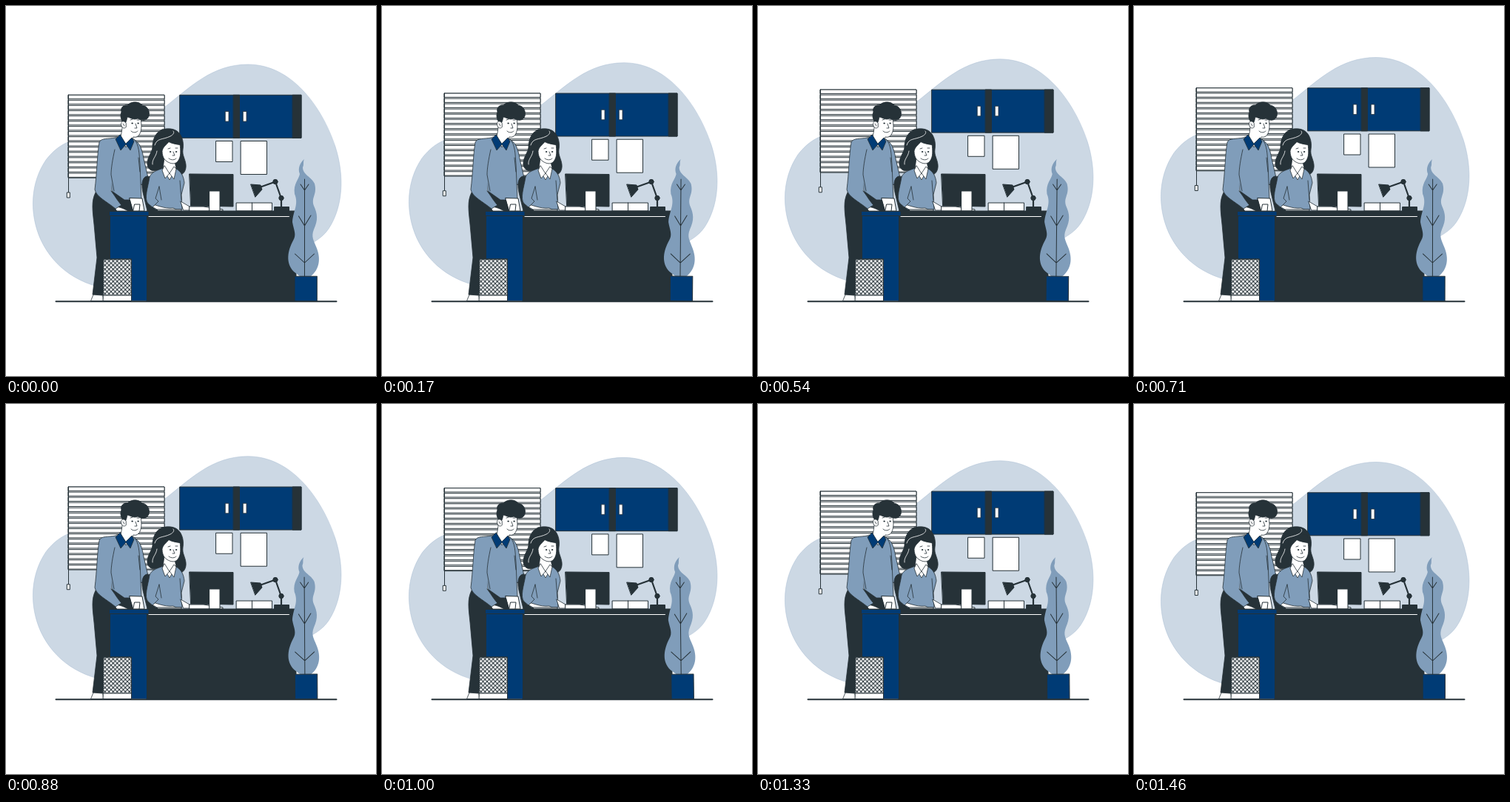
Recreate the animation shown at these times as an HTML page. Size 500 by 500 pixels, loop 1.5 s.

```html
<!DOCTYPE html>
<html lang="en">
<head>
<meta charset="utf-8">
<title>Office</title>
<style>
  html, body { margin: 0; width: 100%; height: 100%; overflow: hidden; background: #fff; }
  svg { display: block; width: 100%; height: 100%; }
  .ink { fill: #263238; }
  .blue { fill: #003b75; }
  .mid { fill: #809dba; }
  .pale { fill: #ccd8e4; }
  .white { fill: #fff; }
  .edge { stroke: #263238; stroke-width: 1; stroke-linejoin: round; stroke-linecap: round; }
  .line { fill: none; }
  .thin { stroke-width: .8; }
</style>
</head>
<body>
<svg viewBox="0 0 500 500">
  <defs>
    <pattern id="mesh" width="5.5" height="5.5" x="131" y="342" patternUnits="userSpaceOnUse">
      <path d="M0 0L5.5 5.5M5.5 0L0 5.5" stroke="#263238" stroke-width="1"/>
      <circle cx="2.75" cy="2.75" r="1.1" class="ink"/>
    </pattern>
  </defs>

  <g id="wall">
    <path class="pale" stroke="#a9bdd2" stroke-width=".5" d="M327 79C386 79 427 136 445 190C458 231 455 272 436 301C419 326 385 330 350 345C290 368 215 392 150 384C100 379 65 354 47 316C31 280 33 239 54 208C68 190 84 180 110 178C155 174 190 155 214 137C249 110 278 79 327 79Z"/>
    <g id="blind" class="white edge"></g>
    <path class="line edge" d="M84.5 120V252"/>
    <rect class="white edge" x="82.7" y="252" width="3.6" height="7"/>
    <g class="edge">
      <rect class="blue" x="235" y="120.3" width="164" height="58"/>
      <path class="ink" d="M307.5 120.3h8v58h-8zM387.5 120.3H399v58h-11.500z"/>
      <path class="white thin" d="M296.500 142.500h4.500v13.500h-4.500zM320.500 142.500h4.500v13.500h-4.500z"/>
      <path class="white" d="M284 182.500h22v28h-22zM317.500 182.500h35v45h-35z"/>
    </g>
  </g>

  <!-- man -->
  <g class="edge thin">
    <path class="white" d="M119 388L114.500 398.500H133L130 389Z"/>
    <path class="ink" d="M121 252C115 264 117 276 119 295L123 340L117 390L130 391L142 340V277H172L170 250Z"/>
    <path class="mid" d="M172 180C181 184 184 194 186 206L192 232L183 242L170 225Z"/>
    <path class="mid" d="M150 177L173 180C180 187 180 200 181 214L183 262L160 262L143 250L140 185Z"/>
    <path class="white" d="M146 271C152 271 158 273 165 277H150Z"/>
    <path class="mid" d="M148 178C138 180 129 178 126 184C123 202 123 225 120 248C122 258 136 264 148 274L156 269C149 261 147 256 142 250"/>
    <path class="line" d="M147 194C144 207 142 220 142 228L146 250M179 205L181 224"/>
    <path class="white" d="M158 155C157 162 157 169 155 176L162 191L171 179L172 177C180 179 183 170 183 162L182 148L160 147Z"/>
    <path class="blue" d="M154 174L148 180L155 195L162 187L168 195L173 183L170 178L162 186Z"/>
    <path class="ink" d="M158 157C155 153 154 148 156 143C154 137 160 133 164 134C170 128 180 129 184 134C191 135 195 142 193 149C190 156 183 155 178 152C172 155 167 150 164 150C163 154 162 160 159 160Z"/>
    <path class="white" d="M162 158C158 153 154 157 156 162C157 165 160 166 162 164Z"/>
    <path class="line" d="M168 154l3-1M177 154l3 0M175 159l2 6l-3 0M169 169C172 172 176 171 178 169M158 159l2 3"/>
    <circle class="ink" cx="170.500" cy="158.500" r=".7"/>
    <circle class="ink" cx="178.500" cy="158.500" r=".7"/>
  </g>

  <!-- woman -->
  <g class="edge thin">
    <path class="ink" d="M190 230C183 232 183 243 185 252L191 277H205L201 232Z"/>
    <path class="ink" d="M211 167C202 171 199 179 198 188C199 196 192 202 191 211C190 219 196 225 204 222L214 229H232C240 229 244 222 243 214C242 206 238 202 239 194C241 183 237 170 227 167C221 165 215 166 211 167Z"/>
    <path class="mid" d="M213 219C204 222 197 224 194 231C193 245 190 256 190 265L202 275H238L237 255L241 239C240 230 237 224 230 220Z"/>
    <path class="white" d="M197 268C205 269 212 274 226 273L232 276H206L195 270ZM236 264L248 271L273 272L275 276H240Z"/>
    <path class="mid" d="M194 231C192 245 186 260 192 267L198 272L206 264L202 260L207 244"/>
    <path class="line" d="M207 244L210 262M235 236L237 262"/>
    <path class="white" d="M214 205L212 220L221 235L230 220L228 210Z"/>
    <path class="white" d="M214 216L211 222L215 233L221 226L227 234L230 220L227 217L221 226Z"/>
    <path class="white" d="M212 188C210 196 211 204 215 208C220 213 228 215 232 210C237 204 236 195 235 186C227 187 220 185 217 181Z"/>
    <path class="ink" d="M211 195C214 188 218 187 221 182C226 187 232 187 237 188L234 177L218 174L208 182Z"/>
    <path class="line" d="M219 193l3-1M229 192l3 0M226 197l2 5l-3 0M220 206C224 209 228 208 230 206"/>
    <circle class="ink" cx="222" cy="197" r=".7"/>
    <circle class="ink" cx="230" cy="197" r=".7"/>
    <path class="line" style="stroke:#fff" d="M201 188C204 178 212 181 222 176C226 174 228 171 226 169M204 196C203 204 197 207 198 214"/>
  </g>

  <!-- desk -->
  <g class="edge">
    <path class="white" d="M248 271H267L293 275V277H248ZM205 275H237V277H205Z"/>
    <path class="ink" d="M248 227L307 227.500V271L250 270Z"/>
    <path class="white" d="M275 250h14v27h-14zM311.500 266H359.500V277H311.500zM332.500 266V277"/>
    <path class="white" d="M167 259.500L184 260L187 277H172Z"/>
    <path class="white" d="M174 268H181L180 277H172Z"/>
    <path class="line" stroke-width="2" style="stroke-width:2.200" d="M340 246L364 237.500L372 260V272"/>
    <path class="ink" d="M331 241L344 242L346 248L337 258ZM363 271.500H382.500V277H363Z"/>
    <circle class="ink" cx="364" cy="237.500" r="3.200"/>
    <circle class="ink" cx="372" cy="259.500" r="3.200"/>
    <path class="ink" d="M190 277H392V398.500H190Z"/>
    <path class="blue" d="M141 283H190V398.500H141Z" stroke="none"/>
    <path class="blue" d="M140 277.500H193V283.500H140Z"/>
    <path class="line" style="stroke:#fff" d="M193 284.500H382.500"/>
  </g>

  <!-- bin -->
  <rect class="white edge" x="131.500" y="342" width="38" height="56.500"/>
  <rect class="edge" x="131.500" y="342" width="38" height="49" fill="url(#mesh)"/>

  <path class="line edge" style="stroke-width:2" d="M67.500 399.300H446.500"/>

  <g id="plant">
    <path class="mid" d="M403 207C397 212 394 220 397 227C396 234 388 240 390 254C396 268 388 277 387 292C389 303 393 309 388 317C381 330 377 347 389 359L398 366H411C424 356 426 341 419 325C416 317 412 312 416 302C422 289 421 281 416 270C412 258 421 255 417 240C413 231 401 228 401 218C403 214 401 211 403 207Z"/>
    <path class="line edge" d="M403.500 234V366M398 241L403.500 249L409 241M395.500 284L403.500 297L412 283M390.500 335L403.500 347L416.500 335"/>
    <rect class="blue edge" x="390" y="365.200" width="30.300" height="33.500"/>
  </g>
</svg>
<script>
  const PERIOD = 1500;
  const wall = document.getElementById('wall');
  const plant = document.getElementById('plant');

  let slats = '';
  for (let i = 0; i < 16; i++) {
    slats += `<rect x="84.5" y="${120.3 + i * 7.05}" width="129.5" height="5.3"/>`;
  }
  document.getElementById('blind').innerHTML =
    '<rect x="84.5" y="120.3" width="129.5" height="112"/>' + slats;

  // Linear wave: 0 → 1 → 0 → -1 → 0 over one unit.
  const triangle = p => 1 - 4 * Math.abs(((p + .25) % 1) - .5);

  function draw(now) {
    const p = now % PERIOD / PERIOD;
    const lift = 10 * (1 - Math.abs(2 * p - 1));
    wall.setAttribute('transform', `translate(0 ${-lift})`);
    plant.setAttribute('transform', `rotate(${triangle(p)} 402 303)`);
    requestAnimationFrame(draw);
  }
  requestAnimationFrame(draw);
</script>
</body>
</html>
```
